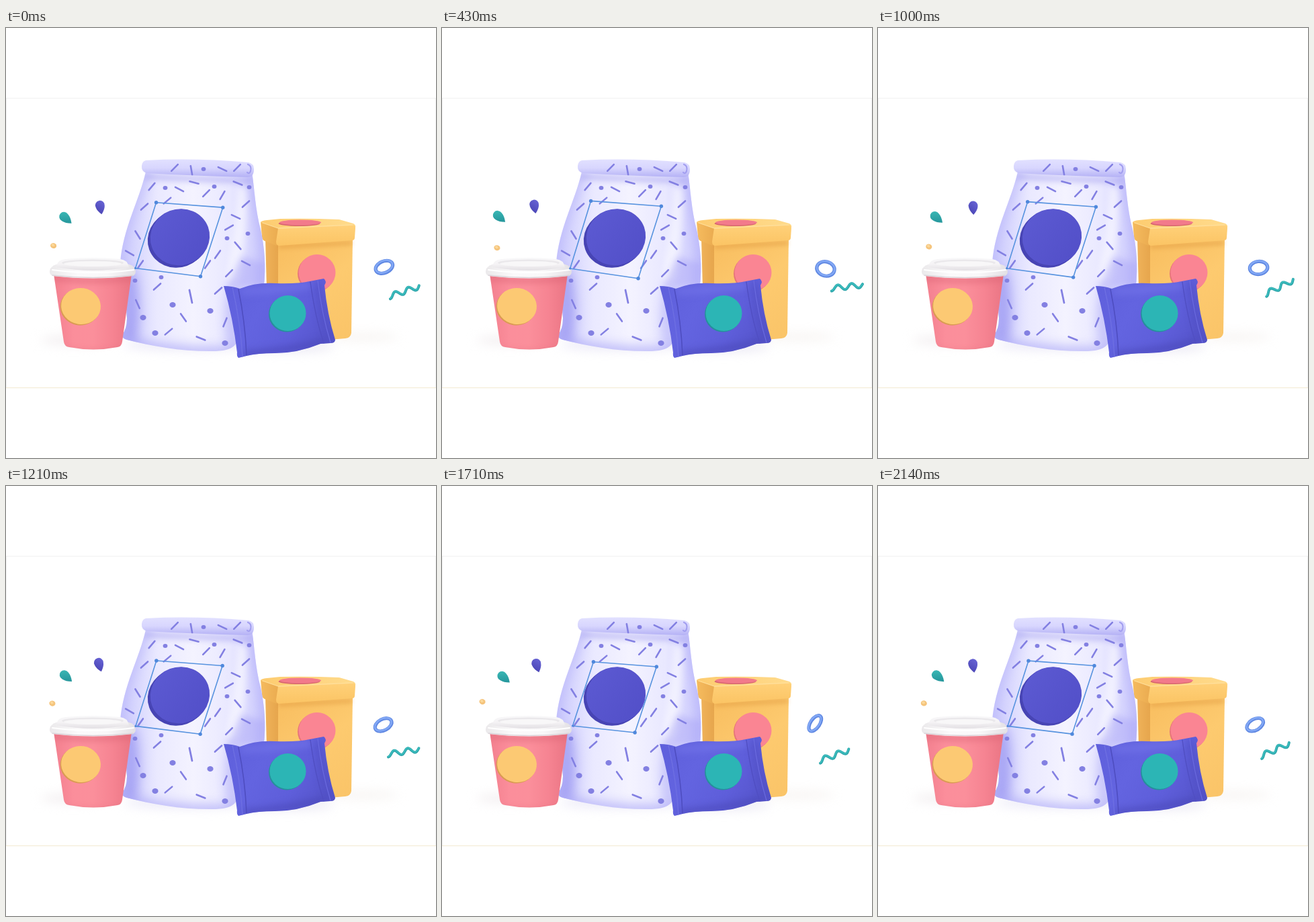
An HTML page with a canvas that plays this animation: 640 px wide and 640 px high, repeating every 2210 ms.

```html
<!DOCTYPE html>
<html>
<head>
<meta charset="utf-8">
<style>
html, body { margin: 0; width: 100%; height: 100%; overflow: hidden; background: #fff; }
canvas { display: block; }
</style>
</head>
<body>
<canvas id="stage" width="640" height="640"></canvas>
<script>
const LOOP = 2210, STEPS = 31, TAU = Math.PI * 2;
const view = document.getElementById('stage').getContext('2d');
const still = document.createElement('canvas');
still.width = still.height = 640;
let c = still.getContext('2d');

function grad(x0, y0, x1, y1, ...cols) {
  const g = c.createLinearGradient(x0, y0, x1, y1);
  cols.forEach((col, i) => g.addColorStop(i / (cols.length - 1), col));
  return g;
}
function fill(d, style) {
  c.fillStyle = style;
  c.fill(new Path2D(d));
}
function line(d, style, width) {
  c.strokeStyle = style;
  c.lineWidth = width;
  c.lineCap = c.lineJoin = 'round';
  c.stroke(new Path2D(d));
}
function oval(x, y, rx, ry, style, rot = 0) {
  c.fillStyle = style;
  c.beginPath();
  c.ellipse(x, y, rx, ry, rot, 0, TAU);
  c.fill();
}
function soft(blur, draw) {
  c.save();
  c.filter = `blur(${blur}px)`;
  draw();
  c.restore();
}
function clipTo(d, draw) {
  c.save();
  c.clip(new Path2D(d));
  draw();
  c.restore();
}
function badge(x, y, rx, ry, face, side, rot = 0) {
  oval(x - 1.5, y + 1.5, rx, ry, side, rot);
  oval(x, y, rx, ry, face, rot);
}

function backdrop() {
  c.fillStyle = '#fff';
  c.fillRect(0, 0, 640, 640);
  c.fillStyle = '#f1f1f1';
  c.fillRect(0, 104, 640, 1);
  c.fillRect(0, 104, 1, 432);
  c.fillRect(639, 104, 1, 432);
  c.fillStyle = '#f3ead2';
  c.fillRect(0, 535, 640, 1);
  soft(8, () => {
    oval(100, 465, 48, 7, '#f3eff1');
    oval(530, 460, 55, 6, '#f7f4f2');
    oval(270, 471, 95, 8, '#eae8f7');
    oval(420, 474, 68, 8, '#ebe9f4');
  });
}

function box() {
  fill('M386 314 L407 318 L408 464 L390 464 Z', grad(386, 0, 408, 0, '#efb259', '#e5a44b'));
  fill('M405 316 L516 312 L514 454 Q513 461 505 462 L470 465 L405 465 Z',
    grad(405, 316, 514, 462, '#f8bd5f', '#fdca6f', '#fac468'));
  soft(3, () => fill('M406 322 L515 317 L515 323 L406 328 Z', 'rgba(222,150,60,.5)'));
  fill('M379 289 Q380 287 388 286 L408 284 Q450 283 496 285 L517 291 Q521 293 520 297 L405 301 Z',
    grad(380, 282, 520, 300, '#fdcc70', '#ffdb8c'));
  fill('M379 289 L406 298 L403 324 L385 317 Q381 315 381 311 Z', grad(379, 0, 406, 0, '#f5bb5e', '#eaab50'));
  fill('M405 298 L515 293 Q520 293 520 298 L519 312 Q519 316 515 316 L407 324 Q402 324 402 318 Z',
    grad(0, 294, 0, 324, '#ffd078', '#fbc464'));
  line('M382 290 L405 298 L516 293', '#ffdf9a', 1.3);
  badge(438, 289.5, 31, 4, '#f27a8b', '#d7676f');
  badge(463, 364, 27.5, 27, '#fa8593', '#e57579');
}

const BAG = 'M208 214 C198 258 174 298 170 350 C170 378 179 402 180 432 Q180 448 173 456 Q172 462 180 464 ' +
  'C220 474 262 482 312 481 Q336 480 342 470 L352 400 L384 384 C387 356 385 326 379 300 C371 270 370 240 366 214 Z';
const ROLL = 'M208 197 Q280 193 361 200 Q369 202 369 210 Q369 222 360 222 Q280 220 209 216 Q201 213 202 205 Q203 198 208 197 Z';

// x, y, angle in degrees, centred on each dash
const DASHES = [
  [251, 208, -45], [276, 212, 80], [322, 210, 25], [344, 208, -45],
  [217, 236, -50], [258, 240, 28], [280, 230, 15], [298, 246, -45], [345, 231, 22],
  [206, 266, -42], [240, 257, -40], [322, 249, -60], [357, 262, -42], [342, 281, 25],
  [196, 308, 58], [184, 335, 30], [332, 297, -30], [345, 324, 50], [315, 337, -55],
  [357, 350, 28], [332, 365, -45], [200, 352, -55], [225, 385, -42], [316, 391, -42],
  [196, 411, 66], [264, 431, 55], [242, 452, -40], [290, 462, 22], [326, 438, -68],
  [300, 352, -55]
];
const DOTS = [
  [294, 210], [237, 238], [310, 236], [362, 237], [248, 412], [204, 431], [304, 421],
  [326, 469], [222, 454], [192, 376], [231, 371], [329, 313], [360, 306]
];

function confetti(pick) {
  const ink = '#8380e2';
  for (const [x, y, a] of DASHES.filter(pick)) {
    const r = a * TAU / 360, u = Math.cos(r) * 6.8, v = Math.sin(r) * 6.8;
    line(`M${x - u} ${y - v} L${x + u} ${y + v}`, ink, 2.6);
  }
  line('M273 390 L277 409', ink, 2.8);
  for (const [x, y] of DOTS.filter(pick)) oval(x, y, y > 400 ? 4.6 : 3.4, y > 400 ? 4 : 3, ink);
}

function bag() {
  fill(BAG, grad(172, 0, 386, 0, '#cccbfd', '#eae9ff', '#f4f3ff', '#e9e8ff', '#cac8fd'));
  clipTo(BAG, () => {
    soft(9, () => {
      line('M205 216 C194 260 168 300 166 350 Q176 410 176 464', '#b9b6fa', 12);
      line('M182 372 Q190 420 182 466', '#a3a0f3', 22);
      line('M368 216 C374 270 390 300 388 380', '#b5b2f9', 13);
      line('M176 470 Q260 486 345 484', '#a9a6f6', 13);
      line('M342 386 Q330 420 340 480', '#b1aef7', 12);
    });
    soft(5, () => {
      fill('M345 236 Q342 300 328 374 L346 382 Q360 310 358 240 Z', 'rgba(255,255,255,.55)');
      fill('M350 340 Q338 364 330 384 L386 386 L386 350 Z', 'rgba(166,162,246,.45)');
      line('M206 221 Q280 225 366 227', '#a9a5f0', 5);
    });
    confetti(p => p[1] > 224);
  });
  fill(ROLL, grad(0, 195, 0, 222, '#e2e1ff', '#d8d6fe', '#b4b1f5'));
  clipTo(ROLL, () => confetti(p => p[1] < 224));
  line('M360 203 Q366 205 364 213 Q362 218 359 215', '#a39ff0', 2.2);
  badge(258.5, 311.5, 45, 42, '#5653ca', '#403da7', -0.35);
  oval(255, 314.5, 44.5, 42, '#4744b4', -0.35);
  oval(258.5, 311.5, 44, 41.5, grad(215, 280, 300, 345, '#5c5ad2', '#524fc8'), -0.35);
}

const WRAP = 'M324 384 Q337 384 348 388 Q372 378 402 380 Q434 381 452 377 L473 373 ' +
  'Q478 377 474 383 Q478 426 490 464 Q490 469 483 469 L468 470 Q434 484 400 484 ' +
  'Q374 484 358 488 L346 491 Q343 488 344 483 Q338 432 324 384 Z';

function wrapper() {
  fill(WRAP, grad(326, 390, 480, 480, '#5f60dc', '#6364e0', '#5e5eda', '#5453c8'));
  clipTo(WRAP, () => {
    soft(6, () => {
      line('M352 392 Q400 390 452 383', '#7475ea', 7);
      line('M356 486 Q410 482 474 468', '#4a48b8', 7);
      line('M464 382 Q470 430 480 466', '#4f4dc0', 6);
    });
    line('M346 389 Q356 438 358 487', '#4e4dc0', 1.6);
    line('M337 386 Q349 438 352 490', '#6e6fe2', 1.3);
    line('M453 378 Q460 430 473 469', '#504ec2', 1.4);
    line('M464 376 Q470 426 483 468', '#6a6adf', 1.2);
  });
  badge(419.5, 424.5, 27, 26.5, '#2cb5b5', '#268f9c');
}

function cup() {
  const body = 'M71 366 L187 366 L173 467 Q172 474 166 475 Q130 482 94 475 Q87 474 86 467 Z';
  fill(body, grad(72, 0, 187, 0, '#f3808f', '#fb8e9b', '#fb8f9b', '#f68492', '#ea7584'));
  clipTo(body, () => soft(4, () => {
    line('M70 372 Q130 380 190 372', 'rgba(216,95,113,.55)', 6);
    line('M86 479 Q130 486 174 479', 'rgba(216,95,113,.45)', 5);
  }));
  fill('M66 358 Q70 352 80 351 L178 351 Q189 352 192 358 Q195 366 189 369 Q130 376 69 369 Q63 366 66 358 Z',
    grad(65, 0, 193, 0, '#ebe9eb', '#fbfafb', '#f9f8f9', '#e3e0e4'));
  line('M69 368 Q130 375 189 368', '#dad5da', 1.3);
  fill('M75 356 Q76 345 88 344 Q128 340 170 344 Q181 345 183 356 Q130 366 75 356 Z',
    grad(0, 342, 0, 361, '#f8f8f9', '#f5f3f5', '#e3e0e4'));
  oval(129, 349.5, 46, 5, '#eae8eb');
  oval(129, 351, 43, 4, '#f8f7f8');
  line('M69 360 Q130 368 190 360', '#fff', 2);
  badge(111.5, 414, 29.5, 27, '#fcc973', '#da9b52', 0.15);
}

function drop(x, y, tx, ty, r, light, dark) {
  const len = Math.hypot(tx, ty);
  c.save();
  c.translate(x, y);
  c.rotate(Math.atan2(ty, tx));
  fill(`M${len} 0 Q${len * .55} ${r * .85} ${r * .3} ${r * .96} A${r} ${r} 0 1 1 ${r * .3} ${-r * .96} Q${len * .55} ${-r * .85} ${len} 0 Z`,
    grad(-r, -r, r, r, light, dark));
  c.restore();
}

function frameBox(s) {
  const pts = [
    [223.4 - 2 * s, 259.5 - 2.3 * s], [323 + 3.7 * s, 267 - 2 * s],
    [289.7 + 2.6 * s, 370 + 3 * s], [192.5 - 2 * s, 357.5 + .5 * s]
  ];
  line('M' + pts.map(p => p.join(' ')).join(' L') + ' Z', '#5793df', 1.6);
  pts.forEach(([x, y], i) => oval(x, y, i < 3 ? 2.7 : 1.6, i < 3 ? 2.7 : 1.6, '#4f88dc'));
}

function ring(s) {
  c.save();
  c.translate(563.5 + 8.2 * s, 356 + 2.7 * s);
  c.rotate((-20 + 36 * s) * TAU / 360);
  for (const [col, w, dy] of [['#6088e2', 5.2, 0], ['#82a8f5', 2.6, -.7]]) {
    c.strokeStyle = col;
    c.lineWidth = w;
    c.beginPath();
    c.ellipse(0, dy, 13.3, 8.8 + 2 * s, 0, 0, TAU);
    c.stroke();
  }
  c.restore();
}

function squiggle(s, f) {
  let d = '';
  for (let i = 0; i <= 60; i++) {
    const p = i / 60, a = -Math.PI / 2 + p * 4.6 * Math.PI;
    d += `${i ? 'L' : 'M'}${(p - .5) * 47} ${-4 * Math.sin(a)}`;
  }
  c.save();
  c.translate(593.7 + 10 * s, 391.5 - 10 * s + 3.5 * f);
  c.rotate((-17 + 15 * f) * TAU / 360);
  line(d, '#2ea5aa', 4);
  c.translate(0, -.6);
  line(d, '#3abcbd', 2);
  c.restore();
}

function draw(t) {
  const s = Math.cos((t - 580) / LOOP * TAU);
  const f = Math.cos((t - 293) / LOOP * 2 * TAU);
  c = view;
  c.drawImage(still, 0, 0);
  frameBox(s);
  drop(139.5 - 3.3 * f, 263.5 - 1.5 * f, 2.6 - 2 * s + 2 * f, 13.5, 7, '#6b67d8', '#4d48b8');
  drop(85.8 - 3.5 * s, 280.6 - 2 * s, 11.5, 10, 7, '#3cbcb8', '#26979c');
  oval(71.5 + 11.5 * s, 324.3 + 3.2 * s, 4.6, 4, '#f5c47c', .3);
  oval(70.8 + 11.5 * s, 323.3 + 3.2 * s, 2.4, 1.9, '#fbd89a', .3);
  ring(s);
  squiggle(s, f);
}

backdrop();
box();
bag();
wrapper();
cup();

const start = performance.now();
function tick() {
  const t = (performance.now() - start) % LOOP;
  const step = Math.floor((t + 4) * STEPS / LOOP) % STEPS;
  draw(step * LOOP / STEPS);
  requestAnimationFrame(tick);
}
tick();
</script>
</body>
</html>
```
